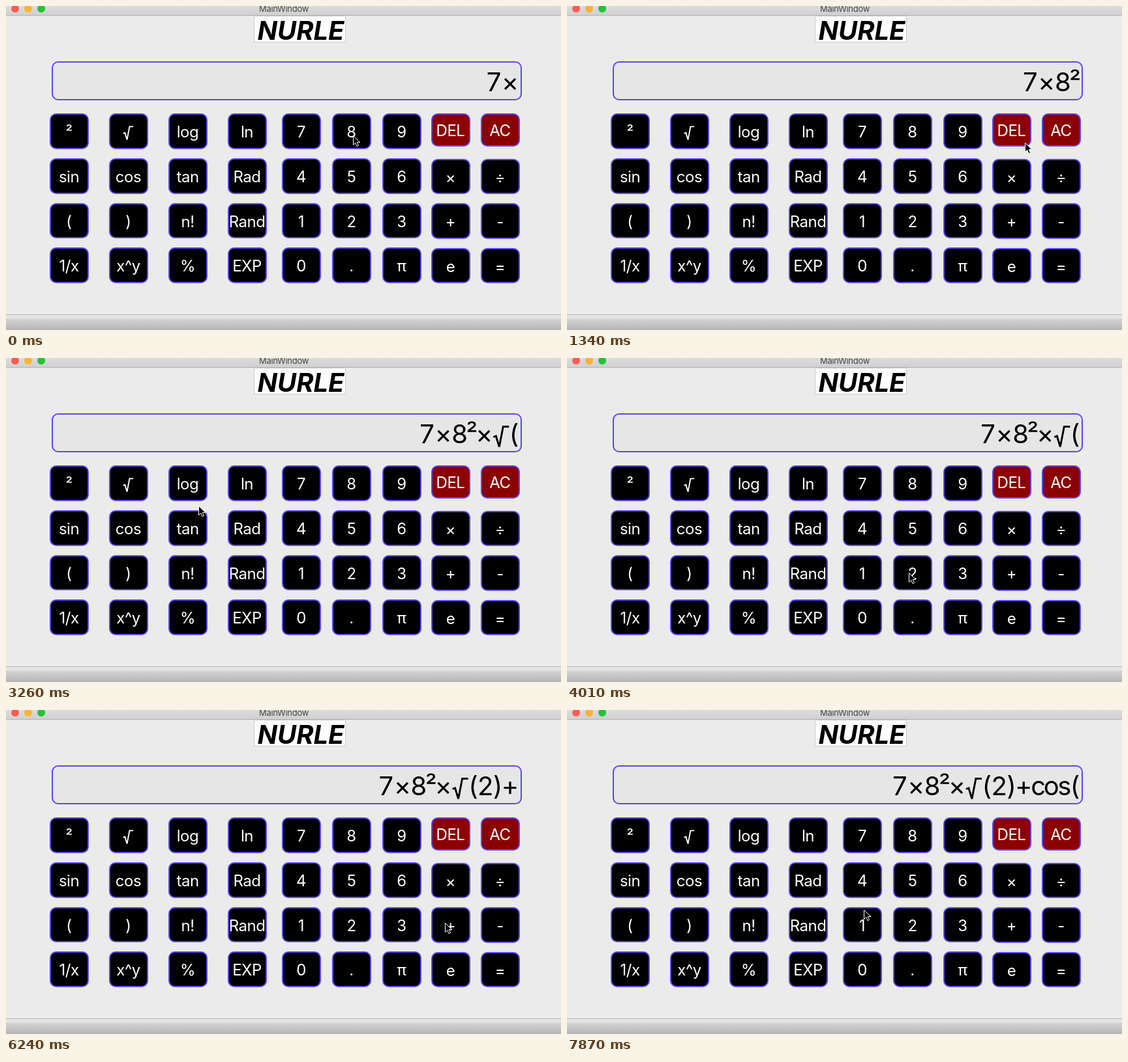
An HTML page that plays this animation: 851x498 px, repeating every 8 s.

```html
<!DOCTYPE html>
<html lang="en">
<head>
<meta charset="utf-8">
<title>Calculator</title>
<style>
  html, body { margin: 0; width: 100%; height: 100%; overflow: hidden; background: #ebebeb; }
  svg { display: block; }
  text { font-family: Inter, Roboto, sans-serif; text-anchor: middle; font-feature-settings: "calt" 0; }
  .key { stroke: #5a48f2; stroke-width: 2; }
  .label { fill: #fff; font-size: 24px; letter-spacing: -.5px; }
  .root { fill: none; stroke-width: 2.9; }
</style>
</head>
<body>
<svg width="851" height="498" viewBox="0 0 851 498">
  <defs>
    <linearGradient id="bar" x2="0" y2="1">
      <stop stop-color="#dcdcdc"/><stop offset="1" stop-color="#d0d0d0"/>
    </linearGradient>
    <linearGradient id="status" x2="0" y2="1">
      <stop stop-color="#e8e8e8"/><stop offset=".2" stop-color="#e2e2e2"/>
      <stop offset=".28" stop-color="#d4d4d4"/><stop offset="1" stop-color="#b4b4b4"/>
    </linearGradient>
    <path id="root" d="M-12-9.5L-8-11L-3 5.5L3-25.5H12"/>
  </defs>
  <rect width="851" height="498" fill="#ebebeb"/>
  <rect width="851" height="14" fill="url(#bar)"/>
  <rect y="14" width="851" height="1" fill="#b2b2b2"/>
  <circle cx="14" cy="4" r="6" fill="#fc5b57"/>
  <circle cx="34" cy="4" r="6" fill="#fdb32d"/>
  <circle cx="54" cy="4" r="6" fill="#27c138"/>
  <text x="426" y="9" font-size="13" letter-spacing="-.3" fill="#444">MainWindow</text>
  <rect x="380.5" y="15.5" width="140" height="40" fill="#fff" stroke="#cacaca"/>
  <text x="452" y="52" font-size="40" font-weight="700" font-style="italic">NURLE</text>
  <rect x="71" y="86" width="719" height="58" rx="9" fill="#e6e6e6" stroke="#5a48f2" stroke-width="2"/>
  <g id="entry" font-size="40"></g>
  <g id="keys"></g>
  <rect y="474" width="851" height="1" fill="#b0b0b0"/>
  <rect y="475" width="851" height="23" fill="url(#status)"/>
  <path id="cursor" d="M.5.5V14.5L3.8 11.4L6 16.7L8.5 15.6L6.3 10.5H10.8Z" fill="#000" stroke="#fff" stroke-linejoin="round"/>
</svg>
<script>
const LOOP = 8000, TICK = 148.5, LEAD = 8;
const ROW_PITCH = 68.7;
const ENTRY_RIGHT = 785.5;
const byId = id => document.getElementById(id);

function add(parent, tag, attrs, text = '') {
  const node = document.createElementNS('http://www.w3.org/2000/svg', tag);
  for (const name in attrs) node.setAttribute(name, attrs[name]);
  node.textContent = text;
  return parent.appendChild(node);
}

// The radical is drawn at a size of 40 and scaled to its text.
function addLabel(parent, label, x, y, size, color, className = '') {
  if (label === '√') {
    add(parent, 'use', {
      href: '#root', class: 'root', stroke: color,
      transform: `translate(${x} ${y}) scale(${size / 40})`
    });
  } else {
    add(parent, 'text', { x, y, class: className }, label);
  }
}

const panels = [
  { x: 67, y: 165.3, pitch: 91, rows: ['² √ log ln', 'sin cos tan Rad', '( ) n! Rand', '1/x x^y % EXP'] },
  { x: 423, y: 165.3, pitch: 77, rows: ['7 8 9', '4 5 6', '1 2 3', '0 . π'] },
  { x: 652, y: 165, pitch: 76, rows: ['DEL AC'], height: 51, fill: '#8b0000' },
  { x: 652, y: 234.5, pitch: 76, rows: ['× ÷', '+ -', 'e ='] }
];

for (const { x, y, pitch, rows, height = 54.55, fill = '#000' } of panels) {
  rows.forEach((row, r) => row.split(' ').forEach((label, c) => {
    const left = x + pitch * c, exactTop = y + ROW_PITCH * r;
    const top = Math.round(exactTop), bottom = Math.round(exactTop + height);
    add(byId('keys'), 'rect', {
      x: left + 1, y: top + 1, width: 58, height: bottom - top - 2, rx: 9, fill, class: 'key'
    });
    const baseline = Math.round(exactTop + height / 2 + 9.75);
    addLabel(byId('keys'), label, left + 29.5, baseline, 26, '#fff', 'label');
  }));
}

// Cursor glides, in ticks: [leave, arrive, x, y]
const glides = [
  [0, 0, 532, 199], [2, 6, 110, 190], [7, 9, 702, 210], [9, 11, 688, 252],
  [14, 17, 256, 181], [17, 19, 199, 194], [21, 25, 583, 325], [25, 27, 524, 330],
  [30, 35, 181, 336], [38, 41, 673, 327], [43, 48, 203, 257], [50, 53, 455, 307]
];

// Text appended by each click: [tick, text]
const clicks = [
  [0, '7×'], [1, '8'], [7, '²'], [12, '×'], [20, '√('],
  [29, '2'], [37, ')'], [42, '+'], [49, 'cos(']
];

function cursorAt(tick) {
  const i = glides.findLastIndex(([leave]) => leave <= tick);
  const [leave, arrive, x, y] = glides[i];
  const [, , fromX, fromY] = glides[Math.max(0, i - 1)];
  const k = arrive > leave ? Math.min(1, (tick - leave) / (arrive - leave)) : 1;
  return [fromX + (x - fromX) * k, fromY + (y - fromY) * k].map(Math.round);
}

function advance(char) {
  if (/[²()]/.test(char)) return 12.7;
  if (/[a-z]/.test(char)) return 20;
  return char === '√' ? 27 : 25;
}

function drawEntry(text) {
  const entry = byId('entry');
  entry.textContent = '';
  let right = ENTRY_RIGHT;
  for (const char of [...text].reverse()) {
    addLabel(entry, char, right - advance(char) / 2, 131, 40, '#000');
    right -= advance(char);
  }
}

let shown = -1;
function render(time) {
  const tick = Math.floor((time % LOOP + LEAD) / TICK);
  if (tick === shown) return;
  shown = tick;
  drawEntry(clicks.filter(([at]) => at <= tick).map(([, text]) => text).join(''));
  byId('cursor').setAttribute('transform', `translate(${cursorAt(tick).join(' ')})`);
}

const start = performance.now();
function loop() {
  render(performance.now() - start);
  requestAnimationFrame(loop);
}
loop();
</script>
</body>
</html>
```
